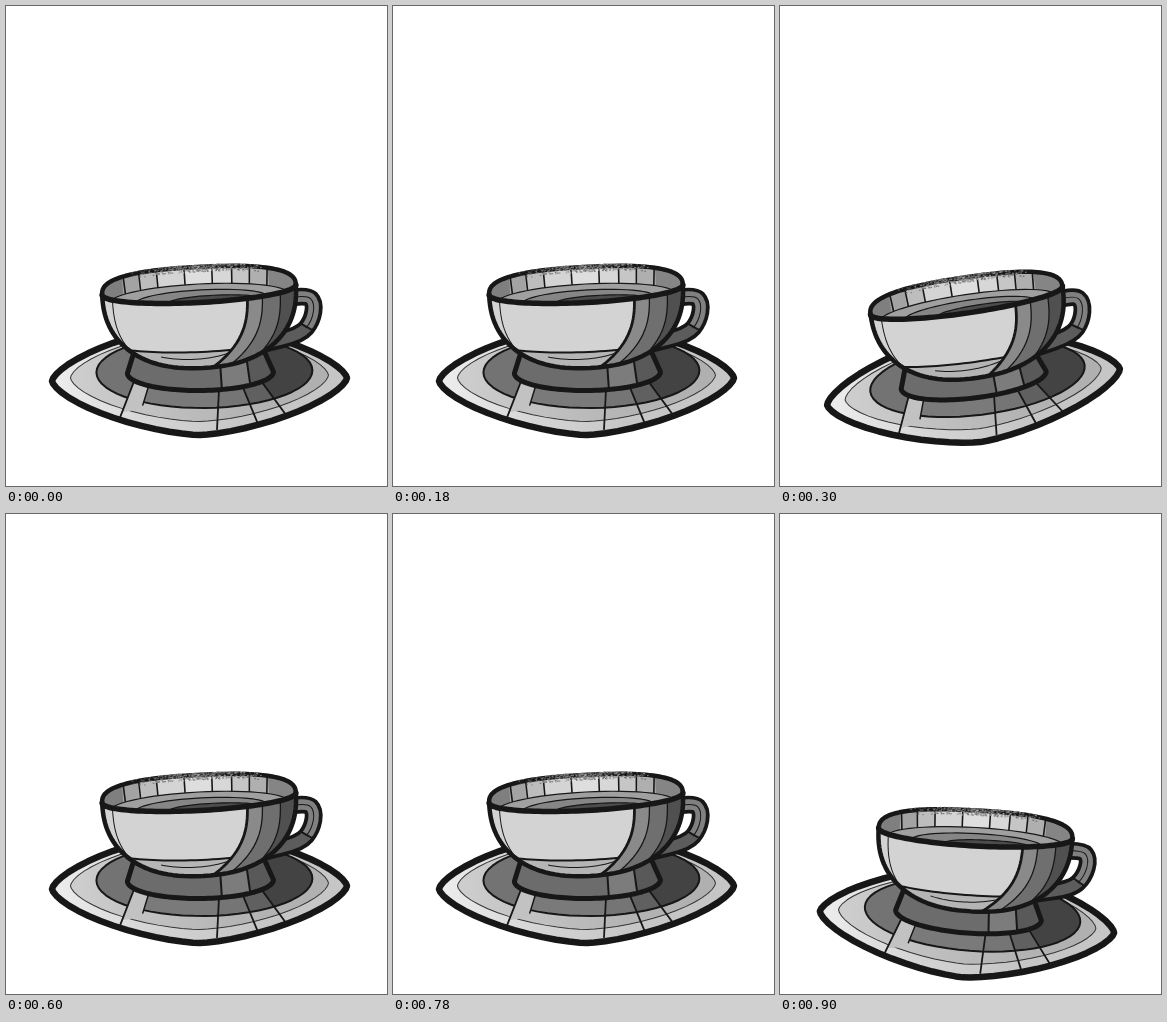
An HTML page with a canvas that plays this animation: 381 px wide and 480 px high, repeating every 1.2 s.

```html
<!DOCTYPE html>
<html lang="en">
<head>
<meta charset="utf-8">
<title>Teacup</title>
<style>
  html, body { margin: 0; width: 100%; height: 100%; overflow: hidden; background: #fff; }
  canvas { display: block; }
</style>
</head>
<body>
<canvas id="stage" width="381" height="480"></canvas>
<script>
const ctx = document.getElementById('stage').getContext('2d');
const INK = '#171717';
const STEP = 300;

// Place and tilt (degrees) of the two rigid parts.
const rest = { cup: [193, 284, -3], saucer: [193.5, 373.5, -0.6] };
const tilt = { cup: [186.5, 294.5, -8.4], saucer: [193.5, 381, -7.1] };
const drop = { cup: [195.5, 319.5, 3.2], saucer: [187, 408, 4.2] };
const poses = [rest, tilt, rest, drop];

// Cup: half width, depth of the bowl, bulge of the near and far rim.
const CUP = { w: 97, depth: 78, near: 12.5, far: 23 };

const bend = (v, p) => Math.sign(v) * Math.abs(v) ** (2 / p);

// Points on a superellipse; p = 2 is a plain ellipse.
function arc(cx, cy, rx, ry, p = 2, from = 0, to = Math.PI) {
  const n = 60;
  return Array.from({ length: n + 1 }, (_, i) => {
    const t = from + (to - from) * i / n;
    return [cx + rx * bend(Math.cos(t), p), cy + ry * bend(Math.sin(t), p)];
  });
}

const oval = (cx, cy, rx, ry, p) => shape(arc(cx, cy, rx, ry, p, 0, 2 * Math.PI));

function open(pts) {
  const path = new Path2D();
  pts.forEach(pt => path.lineTo(...pt));
  return path;
}

function shape(pts) {
  const path = open(pts);
  path.closePath();
  return path;
}

function fill(path, color) {
  ctx.fillStyle = color;
  ctx.fill(path);
}

function line(path, width, color = INK) {
  ctx.lineWidth = width;
  ctx.strokeStyle = color;
  ctx.stroke(path);
}

function inside(path, draw) {
  ctx.save();
  ctx.clip(path);
  draw();
  ctx.restore();
}

function place([x, y, angle], draw) {
  ctx.save();
  ctx.translate(x, y);
  ctx.rotate(angle * Math.PI / 180);
  draw();
  ctx.restore();
}

function ramp(half, ...stops) {
  const g = ctx.createLinearGradient(-half, 0, half, 0);
  stops.forEach((c, i) => g.addColorStop(i / (stops.length - 1), c));
  return g;
}

const grey = v => `rgb(${v},${v},${v})`;

// Fills everything to the right of a line of points.
const fillRight = (pts, color) =>
  fill(shape([[pts[0][0], -80], ...pts, [200, 80], [200, -80]]), color);

function drawSaucer() {
  const plate = oval(0, 0, 147.5, 55.5, 1.5);
  const band = oval(0, -3, 129, 45, 1.6);
  const ring = oval(5, -8, 108, 36.5, 2);
  const spokes = [[-65, -85], [20, 17], [40, 60], [60, 96]].map(([a, b]) => [[a, 0], [b, 50]]);
  const tones = ['#7a7a7a', '#757575', '#606060', '#434343'];

  fill(plate, ramp(140, '#ececec', '#d4d4d4', '#c6c6c6', '#c6c6c6'));
  inside(plate, () => {
    fill(band, ramp(120, '#cdcdcd', '#c0c0c0', '#b4b4b4', '#b0b0b0'));
    line(band, 1, '#333');
    fill(ring, '#737373');
    inside(ring, () => spokes.forEach((s, i) => fillRight(s, tones[i])));
    line(ring, 2);
    fill(shape([[-65, 0], [-50, 3], [-58, 29], [-78, 32]]), '#c2c2c2');
    line(open([[-50, 3], [-57, 25]]), 1.5);
    spokes.forEach(s => line(open(s), 1.8));
  });
  line(plate, 6.5);
  drawFoot();
}

function drawFoot() {
  const foot = shape([[63, -32], ...arc(1, -7, 73, 18), [-64, -32]]);
  fill(foot, '#6c6c6c');
  inside(foot, () => {
    const seams = [20, 46].map(x => [[x, -30], [x * 1.12, 12]]);
    seams.forEach((s, i) => fillRight(s, ['#7c7c7c', '#595959'][i]));
    seams.forEach(s => line(open(s), 2));
  });
  line(foot, 5);
}

function drawHandle() {
  const spine = [[86, 13], [107, 10], [115, 19], [111, 37], [99, 50], [62, 57]];
  const loop = new Path2D(), grip = new Path2D();
  const mid = (a, b) => [(a[0] + b[0]) / 2, (a[1] + b[1]) / 2];
  loop.moveTo(...spine[0]);
  for (let i = 1; i < spine.length - 1; i++) {
    const end = mid(spine[i], spine[i + 1]);
    loop.quadraticCurveTo(...spine[i], ...end);
    if (i === 3) grip.moveTo(...end);
    if (i > 3) grip.quadraticCurveTo(...spine[i], ...end);
  }
  loop.lineTo(...spine[5]);
  grip.lineTo(...spine[5]);
  ctx.lineCap = 'butt';
  line(loop, 18);
  line(loop, 10.5, '#808080');
  line(loop, 1);
  line(grip, 13);
  line(grip, 10.5, '#5c5c5c');
  line(open([[100, 39], [111, 46]]), 2);
  ctx.lineCap = 'round';
}

function drawMouth() {
  const { w, near, far } = CUP;
  const back = arc(0, 0, w, -far, 2.6);
  const mouth = shape([...back, ...arc(0, 0, w, near).reverse()]);
  const ribs = [-w, -76, -60, -42, -14, 14, 34, 52, 70];

  inside(mouth, () => {
    ribs.forEach((x, i) => {
      const center = (x + (ribs[i + 1] ?? w)) / 2;
      ctx.fillStyle = grey(Math.round(222 - 120 * (center / w) ** 2));
      ctx.fillRect(x, -40, 2 * w, 80);
    });
    ribs.slice(1).forEach(x => line(open([[x, -30], [x * 0.97, 0]]), 1.6));
    const pools = [[0, 8, 89, 14], [2, 10, 66, 10], [14, 11, 44, 5]];
    pools.forEach((p, i) => {
      const pool = oval(...p);
      fill(pool, ['#a0a0a0', '#868686', '#4c4c4c'][i]);
      line(pool, 1.2);
    });
  });
  line(open(back), 4.5);
  drawGrain();
}

// Steam wears the far rim down to a grey, grainy edge.
function drawGrain() {
  let seed = 7;
  const rand = () => (seed = seed * 16807 % 2147483647) / 2147483647;
  for (let i = 0; i < 420; i++) {
    const x = (rand() + rand() - 1) * 72;
    const y = -CUP.far * (1 - Math.abs(x / CUP.w) ** 2.6) ** (1 / 2.6);
    ctx.fillStyle = grey(Math.round(60 + 130 * rand()));
    ctx.globalAlpha = 0.7;
    ctx.fillRect(x, y - 2.5 + 7 * rand() ** 1.5, 1.6, 1.2);
  }
  ctx.globalAlpha = 1;
}

// A seam runs down from the rim and curls in under the bowl.
function seam(x) {
  return Array.from({ length: 21 }, (_, i) =>
    [x - Math.sign(x) * 38 * (i / 20) ** 3, CUP.depth * i / 20]);
}

function drawBowl() {
  const { w, depth, near } = CUP;
  const rim = arc(0, 0, w, near), hull = arc(0, 0, w, depth, 2.3);
  const bowl = shape([...rim, ...hull.slice().reverse()]);
  const panel = shape([...arc(5, 44, 108, 18), [-w, -10], [w, -10]]);
  const seams = [48, 63, 81].map(seam);
  const tones = ['#8a8a8a', '#6f6f6f', '#505050'];

  fill(bowl, '#b5b5b5');
  inside(bowl, () => {
    fill(panel, '#d3d3d3');
    line(panel, 2);
    line(open(seam(-87)), 1);
    line(open(arc(-8, 48, 56, 21, 2, 0, 2.2)), 1);
    seams.forEach((s, i) => fillRight(s, tones[i]));
    seams.forEach((s, i) => line(open(s), i ? 1.3 : 2.8));
  });
  line(open(hull), 4.5);
  line(open(rim), 5.5);
}

function draw(pose) {
  ctx.fillStyle = '#fff';
  ctx.fillRect(0, 0, 381, 480);
  ctx.lineCap = ctx.lineJoin = 'round';
  place(pose.saucer, drawSaucer);
  place(pose.cup, () => {
    drawHandle();
    drawMouth();
    drawBowl();
  });
}

let shown;
function tick() {
  const pose = poses[Math.floor(performance.now() / STEP) % poses.length];
  if (pose !== shown) draw(shown = pose);
  requestAnimationFrame(tick);
}
tick();
</script>
</body>
</html>
```
